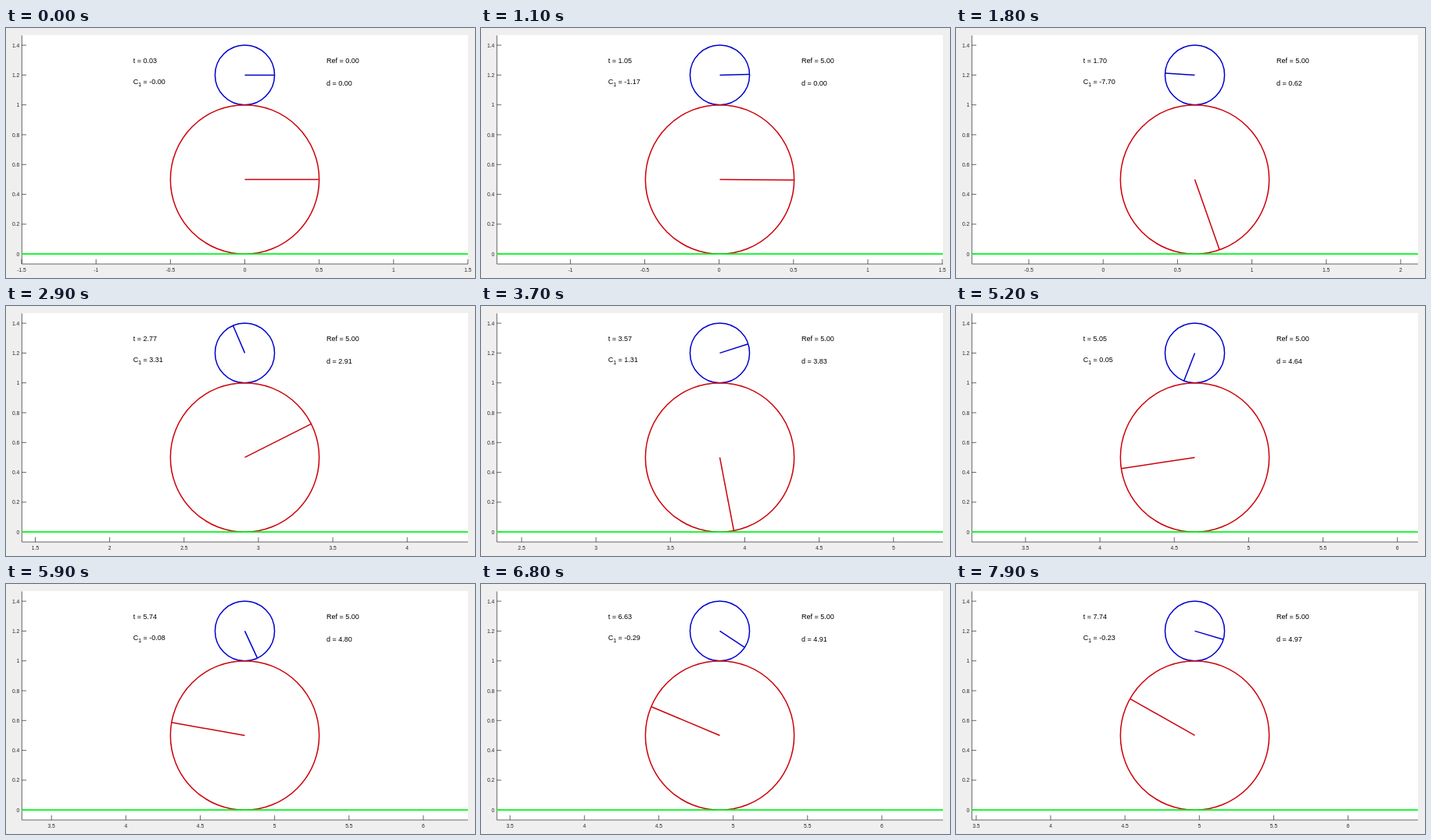
These frames come from a looping animation (600 px wide and 321 px high, 8 s). An HTML page:

```html
<!DOCTYPE html>
<html lang="en">
<head>
<meta charset="utf-8">
<title>Ball on ball</title>
<style>
html, body { margin: 0; width: 100%; height: 100%; overflow: hidden; background: #f0eff0; }
svg { display: block; width: 600px; height: 321px; font-family: "Liberation Sans", Arial, sans-serif; }
.axis { stroke: #262626; stroke-width: .7; fill: none; }
.label { font-size: 6.7px; fill: #262626; }
.info { font-size: 9px; fill: #000; }
.ball { fill: none; stroke-width: 1.5; }
</style>
</head>
<body>
<svg viewBox="0 0 600 321">
  <rect x="20" y="9" width="571" height="294" fill="#fff"/>
  <g id="ticks"></g>
  <path class="axis" d="M20.3 9.5V303H591"/>
  <g id="balls"></g>
  <path d="M20 290.2H591" stroke="#00f51c" stroke-width="1.8"/>
  <g class="info">
    <text id="time" x="162.7" y="45"></text>
    <text x="162.7" y="71.7">C<tspan dy="3.6" font-size="7">1</tspan><tspan id="torque" dy="-3.6"></tspan></text>
    <text id="ref" x="410" y="45"></text>
    <text id="dist" x="410" y="73.5"></text>
  </g>
</svg>
<script>
const $ = id => document.getElementById(id);
const LOOP = 8000, STEP = 100, START = 1, GOAL = 5;
const CX = 305.5, GROUND = 290.2, SX = 190.3, SY = 191.5;

// [playback ms, simulated seconds]
const clock = [[0, .03], [1800, 1.7], [2900, 2.77], [4500, 4.36], [5900, 5.74], [6800, 6.63], [7900, 7.74]];
// [seconds, phase of the critically damped approach]
const phase = [[1, 0], [1.7, .604], [2.77, 1.955], [4.36, 3.58], [5.74, 5.01], [6.63, 5.96], [7.74, 7.2]];
// [seconds, control torque]
const torque = [[1, 0], [1.3, -6.5], [1.7, -7.7], [2.77, 3.31], [3.4, 1.6], [4.36, .33], [5.74, -.08], [6.63, -.29], [7.74, -.23]];

const segment = (keys, x) => {
  let i = 0;
  while (i < keys.length - 2 && x >= keys[i + 1][0]) i++;
  return i;
};

function linear(keys, x) {
  const i = segment(keys, x), [x0, y0] = keys[i], [x1, y1] = keys[i + 1];
  return y0 + (y1 - y0) * (x - x0) / (x1 - x0);
}

function spline(keys, x) {
  const i = segment(keys, x), [x0, y0] = keys[i], [x1, y1] = keys[i + 1];
  const slope = k => {
    const a = keys[Math.max(k - 1, 0)], b = keys[Math.min(k + 1, keys.length - 1)];
    return (b[1] - a[1]) / (b[0] - a[0]);
  };
  const h = x1 - x0, u = (x - x0) / h, v = 1 - u;
  return v * v * (1 + 2 * u) * y0 + u * u * (1 + 2 * v) * y1
    + h * u * v * (v * slope(i) - u * slope(i + 1));
}

function distance(t) {
  if (t < START) return 0;
  const p = spline(phase, t);
  return GOAL * (1 - (1 + p) * Math.exp(-p));
}

function ball(height, r, angle, color) {
  const cy = GROUND - height * SY, rx = r * SX, ry = r * SY;
  return `<g class="ball" stroke="${color}"><ellipse cx="${CX}" cy="${cy}" rx="${rx}" ry="${ry}"/>
    <path d="M${CX} ${cy}l${rx * Math.cos(angle)} ${-ry * Math.sin(angle)}"/></g>`;
}

function ticks(d) {
  let out = "";
  for (let i = 0; i <= 7; i++) {
    const y = GROUND - i * .2 * SY;
    out += `<path class="axis" d="M20 ${y}h6"/>
      <text class="label" x="17.3" y="${y + 2.5}" text-anchor="end">${+(i * .2).toFixed(1)}</text>`;
  }
  for (let n = Math.ceil((d - 1.5) * 2); n <= (d + 1.5) * 2; n++) {
    const x = CX + (n / 2 - d) * SX;
    out += `<path class="axis" d="M${x} 303v-6"/>
      <text class="label" x="${x}" y="312.6" text-anchor="middle">${n / 2}</text>`;
  }
  return out;
}

function draw(now) {
  const ms = Math.floor(now % LOOP / STEP) * STEP;
  const t = linear(clock, ms), d = distance(t), moving = t >= START;
  $("ticks").innerHTML = ticks(d);
  // Rolling without slip: the two balls turn in opposite directions.
  $("balls").innerHTML = ball(1.2, .2, d / .2, "#0000cd") + ball(.5, .5, -d / .5, "#cd0008");
  $("time").textContent = "t = " + t.toFixed(2);
  $("torque").textContent = " = " + (moving ? spline(torque, t) : -.001).toFixed(2);
  $("ref").textContent = "Ref = " + (moving ? GOAL : 0).toFixed(2);
  $("dist").textContent = "d = " + d.toFixed(2);
}

const begin = performance.now();
function loop() {
  draw(performance.now() - begin);
  requestAnimationFrame(loop);
}
loop();
</script>
</body>
</html>
```
